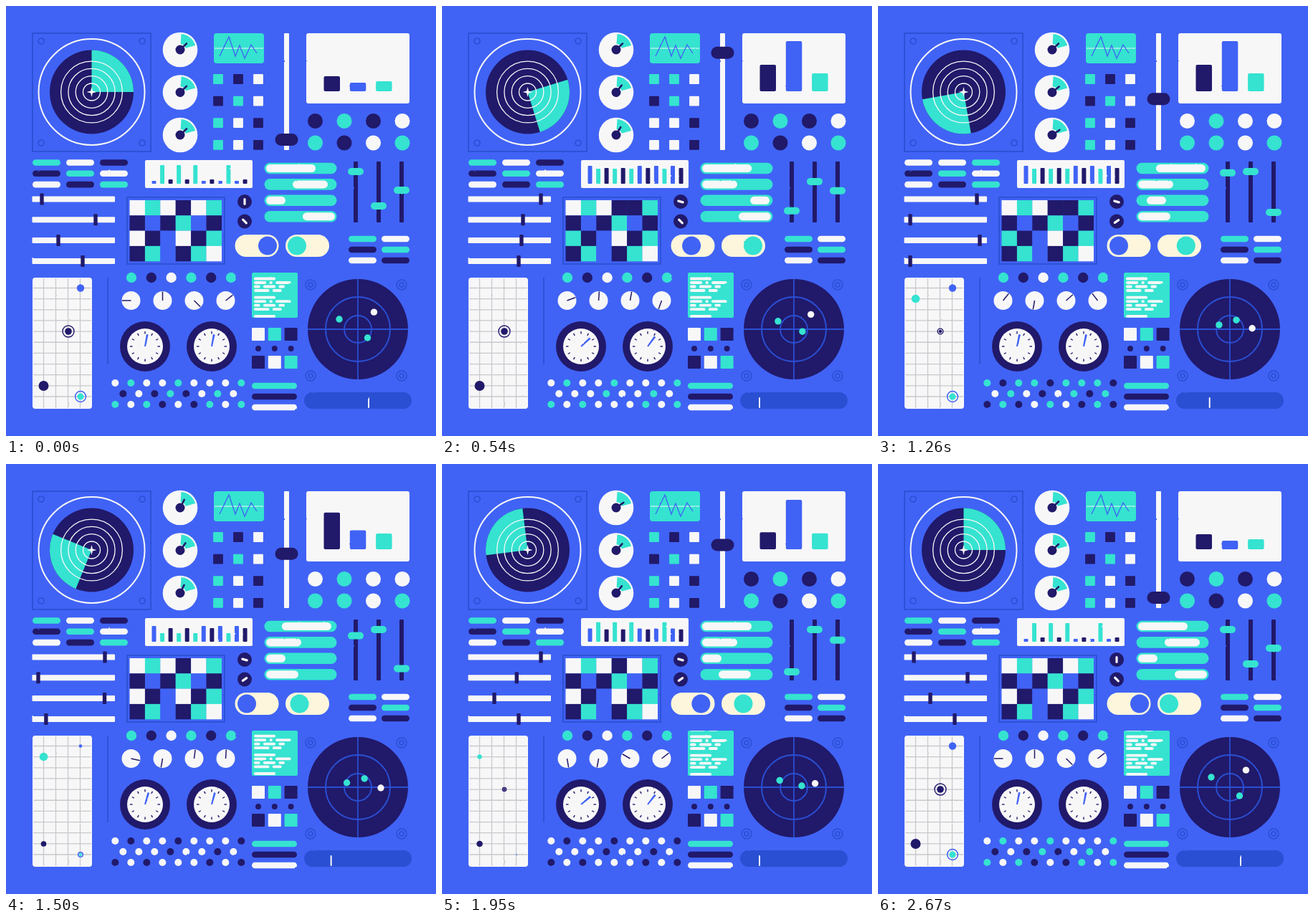
An HTML page with a canvas for the animation above (2.7 s loop, 600 by 600 pixels).

```html
<!DOCTYPE html>
<html lang="en">
<head>
<meta charset="utf-8">
<title>Control panel</title>
<style>
html, body { margin: 0; width: 100%; height: 100%; overflow: hidden; background: #4063f5; }
canvas { display: block; width: 600px; height: 600px; filter: url(#rough); }
svg { position: absolute; width: 0; height: 0; }
</style>
</head>
<body>
<svg><filter id="rough" x="0" y="0" width="100%" height="100%" color-interpolation-filters="sRGB">
  <feTurbulence type="fractalNoise" baseFrequency=".12" numOctaves="2" seed="4"/>
  <feDisplacementMap in="SourceGraphic" scale="1.5" xChannelSelector="R" yChannelSelector="G"/>
</filter></svg>
<canvas id="stage" width="600" height="600"></canvas>
<script>
const ctx = document.getElementById('stage').getContext('2d');
const BLUE = '#4063f5', DEEP = '#2a4fd2', NAVY = '#21196a', TEAL = '#35e3d0', WHITE = '#f8f7f8', CREAM = '#fdf6dc';
const palette = { N: NAVY, T: TEAL, W: WHITE, B: BLUE };
const LOOP = 2700, CYCLE = 2670, FRAME = 30, TAU = Math.PI * 2;
let now = 0;

// Motion: every move is an eased ramp, a there-and-back swing, or a wave.
const rad = deg => deg * Math.PI / 180;
function ramp(start, length = 450) {
  const u = Math.min(1, Math.max(0, (now - start) / length));
  return u * u * (3 - 2 * u);
}
const swing = (home, away, leave, back) => home + (away - home) * (ramp(leave) - ramp(back));
const wave = (cycles = 1, lag = 0) => (1 - Math.cos((now - lag) / CYCLE * cycles * TAU)) / 2;
const beat = () => now < 180 || now > 2340 ? 0 : Math.sin(Math.PI * (now - 180) / 720) ** 2;
const active = () => swing(0, 1, 60, 1760);
const during = (from, to) => now >= from && now < to;

function rect(x, y, w, h, color, r = 1) {
  ctx.fillStyle = color;
  ctx.beginPath();
  ctx.roundRect(x, y, w, h, Math.min(r, w / 2, h / 2));
  ctx.fill();
}
const pill = (x, cy, w, h, color) => rect(x, cy - h / 2, w, h, color, h / 2);
const square = (cx, cy, s, color) => rect(cx - s / 2, cy - s / 2, s, s, color);

function disc(x, y, r, color) {
  if (r <= 0.1) return;
  ctx.fillStyle = color;
  ctx.beginPath();
  ctx.arc(x, y, r, 0, TAU);
  ctx.fill();
}
function ring(x, y, r, color, w = 1.5) {
  if (r <= 0.1) return;
  ctx.strokeStyle = color;
  ctx.lineWidth = w;
  ctx.beginPath();
  ctx.arc(x, y, r, 0, TAU);
  ctx.stroke();
}
function line(points, color, w = 1.5, cap = 'butt') {
  ctx.strokeStyle = color;
  ctx.lineWidth = w;
  ctx.lineCap = cap;
  ctx.beginPath();
  points.forEach(([x, y]) => ctx.lineTo(x, y));
  ctx.stroke();
}
function ray(x, y, angle, from, to, color, w, cap) {
  const c = Math.cos(angle), s = Math.sin(angle);
  line([[x + c * from, y + s * from], [x + c * to, y + s * to]], color, w, cap);
}
function frame(x, y, w, h) {
  ctx.strokeStyle = DEEP;
  ctx.lineWidth = 1.7;
  ctx.strokeRect(x, y, w, h);
}
// One draw(x, y, color) per letter; rows are separated by spaces.
function grid(rows, x, dx, y, dy, draw) {
  rows.split(' ').forEach((row, j) => [...row].forEach((c, i) => draw(x + i * dx, y + j * dy, palette[c])));
}

function sweepRadar() {
  const x = 119.5, y = 120;
  frame(37, 38, 165, 165);
  for (const cx of [49, 190]) for (const cy of [49, 191]) ring(cx, cy, 4, DEEP, 1.6);
  ring(x, y, 74, WHITE, 2);
  disc(x, y, 58.5, NAVY);
  const a = now / CYCLE * TAU - Math.PI / 2;
  ctx.fillStyle = TEAL;
  ctx.beginPath();
  ctx.moveTo(x, y);
  ctx.arc(x, y, 58.5, a, a + Math.PI / 2);
  ctx.fill();
  for (let k = 0; k < 4; k++) ring(x, y, 12 + k * 10.3, WHITE, 1.3);
  ctx.fillStyle = WHITE;
  ctx.beginPath();
  for (let i = 0; i < 8; i++) {
    const r = i % 2 ? 2 : 7, b = i * Math.PI / 4;
    ctx.lineTo(x + r * Math.cos(b), y + r * Math.sin(b));
  }
  ctx.fill();
}

function gauges() {
  for (let i = 0; i < 3; i++) {
    const x = 243, y = 61 + i * 59.5;
    const sway = i ? -14 * i * Math.sin(2 * TAU * now / CYCLE) : 25 * (beat() - active());
    disc(x, y, 24.3, WHITE);
    ctx.fillStyle = TEAL;
    ctx.beginPath();
    ctx.arc(x, y, 22, rad(-86), rad(-16));
    ctx.arc(x, y, 8, rad(-16), rad(-86), true);
    ctx.fill();
    ray(x, y, rad(sway - 44), 0, 12.5, NAVY, 2.6, 'round');
    disc(x, y, 6.5, NAVY);
  }
}

function screen() {
  rect(290, 38, 70, 42, TEAL, 4);
  line([[291, 59], [359, 59]], WHITE, 1.2);
  line([[298, 70], [311, 43], [320, 70], [326, 55], [333, 73], [342, 54], [350, 66]], BLUE, 1.3);
}

function lamps() {
  grid(during(300, 1130) ? 'TTW NTW WWN WWN' : 'TNW NTW TWN TWN', 296, 28, 102, 30.6, (x, y, c) => square(x, y, 13.8, c));
  grid(during(600, 1750) ? 'WTWW TTWT' : 'NTNW TNWT', 431.5, 40.5, 160.5, 30.5, (x, y, c) => disc(x, y, 10.5, c));
  grid(during(600, 1500) ? 'WWT NTW WNT' : 'TWN NTW WNT', 37, 47, 218.5, 15.3, (x, y, c) => pill(x, y, 39, 8.6, c));
  grid('TW NT WN', 478, 46, 325, 15, (x, y, c) => pill(x, y, 39, 8.4, c));
  grid('TNWTNT', 175, 27.8, 379, 0, (x, y, c) => disc(x, y, 7.2, c));
  grid('WTN NWT', 352, 22.8, 458, 39, (x, y, c) => square(x, y, 18, c));
  grid('NNN', 352, 22.8, 478, 0, (x, y, c) => disc(x, y, 4, c));
  grid('T N W', 343, 0, 530, 15, (x, y, c) => pill(x, y, 63, 8.6, c));
}

function fader() {
  rect(388, 38, 7, 163, WHITE);
  const drift = 35 * Math.sin(TAU * (now - 990) / 1440);
  pill(375.5, 186.5 + active() * (drift - 89), 32, 17, NAVY);
}

function chart() {
  rect(419, 38, 144, 98, WHITE, 3);
  const heights = [21 + 35 * active() - 19 * beat(), 12 + 58 * beat(), 14 + 7 * active() + 4 * beat()];
  [NAVY, BLUE, TEAL].forEach((color, i) => rect(443.5 + i * 36.3, 119 - heights[i], 22.5, heights[i], color, 2));
}

function sliders() {
  const stops = [swing(50, 138, 60, 2190), swing(125, 45, 430, 1650), swing(73, 142, 300, 1430), swing(107, 45, 570, 1380)];
  stops.forEach((x, i) => {
    const y = 269.5 + i * 28.8;
    rect(36.5, y - 4, 115.5, 8, WHITE);
    rect(x - 2.7, y - 8, 5.4, 16, NAVY);
  });
}

function equalizer() {
  rect(194, 215, 150, 39, WHITE, 2);
  const heights = { B: 4 + 17 * active() + 4 * beat(), T: 26 - 17 * active() + 12 * beat(), N: 6 + 12 * active() + 4 * beat() };
  [...'BTNTNTBNBTBN'].forEach((c, i) => rect(203.5 + i * 11.55, 248 - heights[c], 6, heights[c], palette[c]));
}

function board() {
  frame(169, 267, 136, 93);
  grid(during(300, 1500) ? 'WTWNNT NBNTBN TNBWNT NTBNTW' : 'WTWNWT NBNTBN WNBWNT NTBNTW',
    172.5, 21.4, 271, 21.3, (x, y, c) => rect(x, y, 21.5, 21.4, c, 0));
}

function knobs() {
  [swing(90, 195, 60, 2190), swing(45, -35, 540, 2190)].forEach((turn, i) => {
    const y = 273 + i * 27.5;
    disc(333, y, 10, NAVY);
    ray(333, y, rad(turn), -3.3, 3.3, WHITE, 3.2, 'round');
  });
}

function progress() {
  function bar(i, x, w) {
    const y = 226.5 + i * 22.4;
    pill(360.5, y, 101, 15.6, TEAL);
    pill(x, y, w, 11, WHITE);
  }
  bar(0, swing(363, 388, 520, 1400), 69);
  bar(1, swing(400, 363, 60, 2170), 49);
  bar(2, swing(363, 431, 120, 930), 27);
  bar(3, swing(414, 363, 530, 1740), 45);
}

function mixer() {
  const stops = [231 + 60 * wave(2), swing(279, 231, 250, 2200), swing(257, 288, 500, 1420) + swing(0, -27, 1750, 2200)];
  stops.forEach((y, i) => {
    const x = 488 + i * 32;
    rect(x - 3, 217, 6, 85, NAVY);
    pill(x - 11, y, 22, 10, TEAL);
  });
}

function toggles() {
  pill(319.5, 334.5, 61, 31, CREAM);
  disc(swing(365, 336, 290, 1600), 334.5, 13, BLUE);
  pill(390, 334.5, 61, 31, CREAM);
  disc(swing(406, 434, 60, 1150) + swing(0, 28, 1720, 2200), 334.5, 13, TEAL);
}

function map() {
  const GREY = '#c8c8cd';
  rect(37, 379, 83, 183, WHITE, 4);
  for (let i = 0; i < 4; i++) line([[52.5 + i * 17, 380], [52.5 + i * 17, 561]], GREY, 1.3);
  for (let i = 0; i < 11; i++) line([[38, 393.5 + i * 15.15], [119, 393.5 + i * 15.15]], GREY, 1.3);
  disc(104, 393.5, 5.2 * (swing(1, 0, 60, 540) - swing(0, 1, 1260, 2200)), BLUE);
  disc(52.5, 408.5, 5.8 * swing(0, 1, 540, 1740), TEAL);
  disc(52.5, 530, 7 * (swing(1, 0, 540, 1260) - swing(0, 1, 1760, 2200)), NAVY);
  const target = swing(1, 0, 1030, 1780);
  disc(87, 454, 4.8 * target, NAVY);
  ring(87, 454, 8 * target, NAVY, 1.4);
  const beacon = swing(1, 0, 60, 540) - swing(0, 1, 1260, 1900);
  disc(104, 545, 4.6 * beacon, TEAL);
  ring(104, 545, 7.4 * beacon, BLUE, 1.5);
  line([[142, 379], [142, 500]], DEEP, 1.6);
}

function dials() {
  const turns = [
    180 + 160 * ramp(60) - 40 * ramp(950) + 140 * ramp(1270) + 100 * ramp(2200),
    swing(-90, 100, 500, 2200),
    swing(45, -80, 60, 2200) + swing(0, 70, 600, 1050) + swing(0, -70, 1450, 2200),
    swing(-38, 110, 60, 560) + swing(0, -100, 900, 1270)
  ];
  turns.forEach((turn, i) => {
    const x = 174.5 + i * 44;
    disc(x, 411, 13, WHITE);
    ray(x, 411, rad(turn), 0, 12.5, NAVY, 1.5);
  });
}

function meter(x, reach) {
  const y = 475;
  disc(x, y, 35, NAVY);
  disc(x, y, 25, WHITE);
  for (let k = 0; k < 12; k++) ray(x, y, k * TAU / 12, 17.5, 21, NAVY, 1.4);
  ctx.save();
  ctx.translate(x, y);
  ctx.rotate(rad(reach * wave(2) - 79));
  ctx.fillStyle = BLUE;
  ctx.beginPath();
  ctx.moveTo(0, -1);
  ctx.lineTo(17, -1.4);
  ctx.lineTo(17, 1.4);
  ctx.lineTo(0, 1);
  ctx.fill();
  ctx.restore();
}
function meters() {
  meter(194, 40);
  meter(287, 28);
}

function beads() {
  const colors = {
    a: during(765, 1485) ? TEAL : WHITE,
    b: during(1125, 1965) ? NAVY : TEAL,
    c: during(270, 2445) ? WHITE : NAVY
  };
  ['abaabaaab', 'cacbcaba', 'babcacbab'].forEach((row, j) => [...row].forEach((c, i) =>
    disc(152.3 + i * 22 + (j % 2) * 11, 526 + j * 15, 5, colors[c])));
}

function codePanel() {
  ctx.save();
  ctx.beginPath();
  ctx.roundRect(343, 372, 64, 63, 2);
  ctx.clip();
  rect(343, 372, 64, 63, TEAL);
  const text = ['-------', '---- - -----', '-- ---- --', '----- ---'];
  for (let block = 0; block < 4; block++) text.forEach((row, i) => {
    const y = 380.5 + block * 26.2 + i * 5.5 - 26.2 * ramp(1450);
    for (const word of row.matchAll(/-+/g)) pill(346 + word.index * 4.3, y, word[0].length * 4.3, 3.8, WHITE);
  });
  ctx.restore();
}

function scope() {
  for (const x of [425, 552]) for (const y of [389, 516]) {
    ring(x, y, 7, DEEP, 1.5);
    ring(x, y, 3, DEEP, 1.5);
  }
  disc(491, 451, 70, NAVY);
  line([[421, 451], [561, 451]], DEEP, 1.8);
  line([[491, 381], [491, 521]], DEEP, 1.8);
  ring(491, 451, 45, DEEP, 1.9);
  ring(491, 451, 19, DEEP, 1.9);
  const near = wave(), far = wave(1, 180);
  disc(465 + 11 * near, 437 + 8 * near, 4.7, TEAL);
  disc(504.5 - 4.5 * near, 463 - 25 * near, 4.7, TEAL);
  disc(513 + 10 * far, 426 + 26 * far, 4.7, WHITE);
}

function tuner() {
  pill(416, 550.5, 150, 23, DEEP);
  rect(swing(506, 443, 60, 1970) + swing(0, 22, 900, 1270) - 1, 546, 2, 15, WHITE);
}

const parts = [sweepRadar, gauges, screen, lamps, fader, chart, sliders, equalizer, board, knobs,
  progress, mixer, toggles, map, dials, meters, beads, codePanel, scope, tuner];
const start = performance.now();
function draw() {
  const elapsed = Math.max(0, performance.now() - start);
  now = Math.floor(elapsed % LOOP / FRAME) * FRAME;
  rect(0, 0, 600, 600, BLUE, 0);
  parts.forEach(part => part());
  requestAnimationFrame(draw);
}
draw();
</script>
</body>
</html>
```
